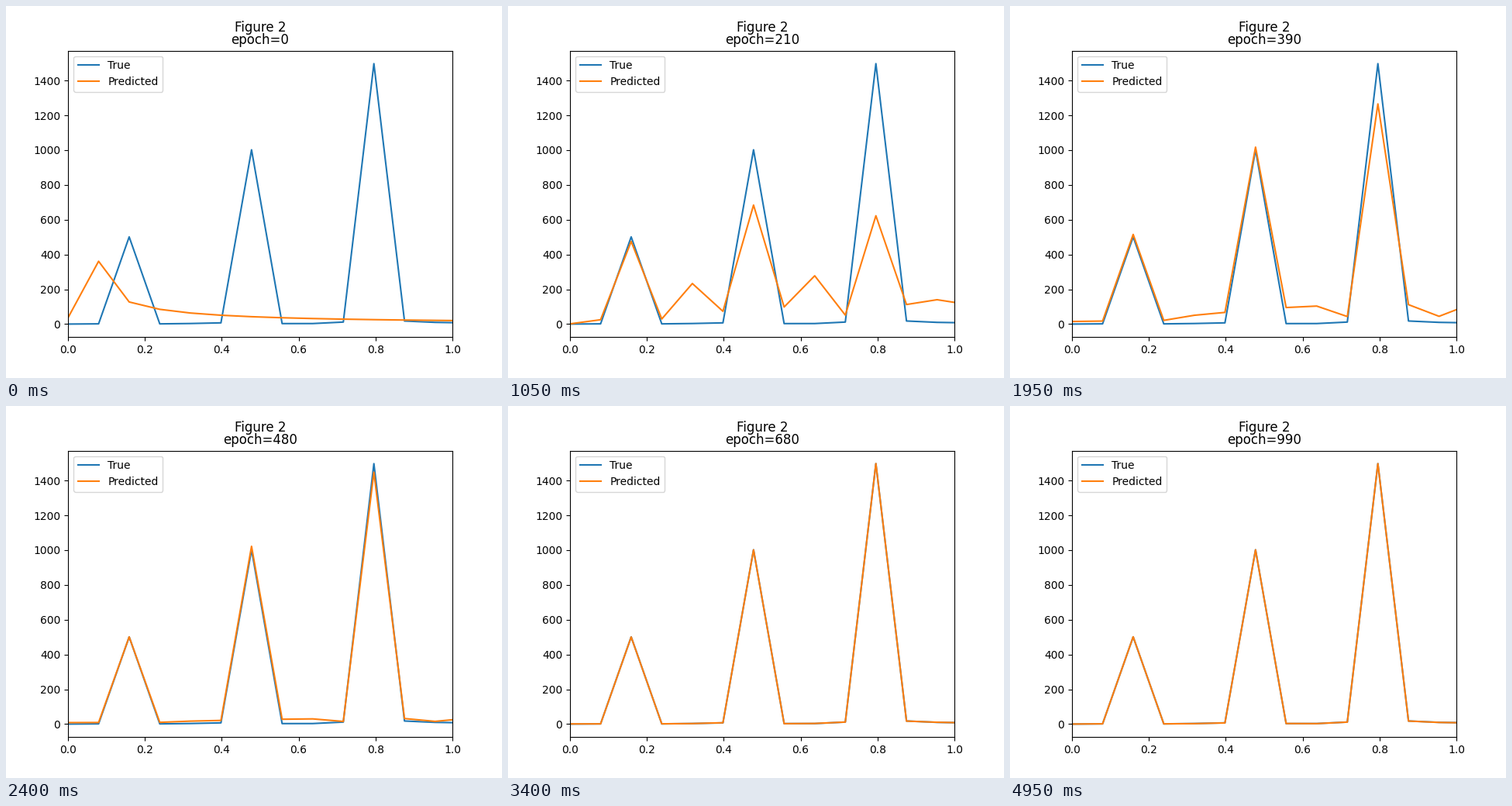
These frames come from a looping animation (640 px wide and 480 px high, 5 s). A matplotlib script:

```python
import matplotlib.pyplot as plt
import numpy as np
from matplotlib.animation import FuncAnimation

FRAMES = 100
EPOCH_STEP = 10
INTERVAL = 50
BINS = 14

# Spectrum of three sines over two periods
t = np.linspace(0, 4 * np.pi, 1000)
signal = np.sin(t) + 2 * np.sin(3 * t) + 3 * np.sin(5 * t)
true = np.abs(np.fft.fft(signal))[:BINS]
k = np.arange(BINS)
freq = k / (4 * np.pi)
peaks = [2, 6, 10]


def with_peaks(floor, gains):
    """Put the three scaled true peaks on a floor of leftover energy."""
    spectrum = floor.copy()
    spectrum[peaks] = true[peaks] * gains
    return spectrum


# Stages of learning: slow drift, even harmonics, the peaks, then convergence
drift = 254 / np.maximum(k, 1)
drift[:2] = 36, 361

harmonics = np.where(k % 2, 20, 430 / (1 + ((k - 3.5) / 8) ** 2))
harmonics[0] = 62

ripple = 24 + 235 * np.tanh((k / 6.5) ** 2) * np.where(k % 3, 1, 0.3)
rough = with_peaks(ripple, [1.06, 1.01, 0.72])
close = with_peaks(6 + 0.1 * ripple, [1, 1.02, 0.967])
near = true + 0.12 * (close - true)

# The mean changes sign on its way to zero
for stage in (rough, close, near):
    stage[0] *= -1

key_epochs = [0, 120, 290, 480, 580, 680]
stages = np.array([drift, harmonics, rough, close, near, true])
roots = np.sign(stages) * np.sqrt(np.abs(stages))
jitter = np.random.default_rng(2).normal(0, 0.4, (FRAMES, BINS))


def predicted(frame):
    epoch = frame * EPOCH_STEP
    value = np.array([np.interp(epoch, key_epochs, r) for r in roots.T]) ** 2
    if epoch > key_epochs[3]:
        value = np.abs(value + jitter[frame])
    return value


fig, ax = plt.subplots(figsize=(6.4, 4.8), dpi=100)
ax.plot(freq, true, label="True")
(line,) = ax.plot(freq, predicted(0), label="Predicted")
ax.set_xlim(0, 1)
ax.set_ylim(ax.get_ylim())
ax.legend(loc="upper left")
title = ax.set_title("Figure 2\nepoch=0", linespacing=0.9)


def update(frame):
    line.set_ydata(predicted(frame))
    title.set_text(f"Figure 2\nepoch={frame * EPOCH_STEP}")
    return line, title


anim = FuncAnimation(fig, update, frames=FRAMES, interval=INTERVAL, repeat=True)
plt.show()
```
